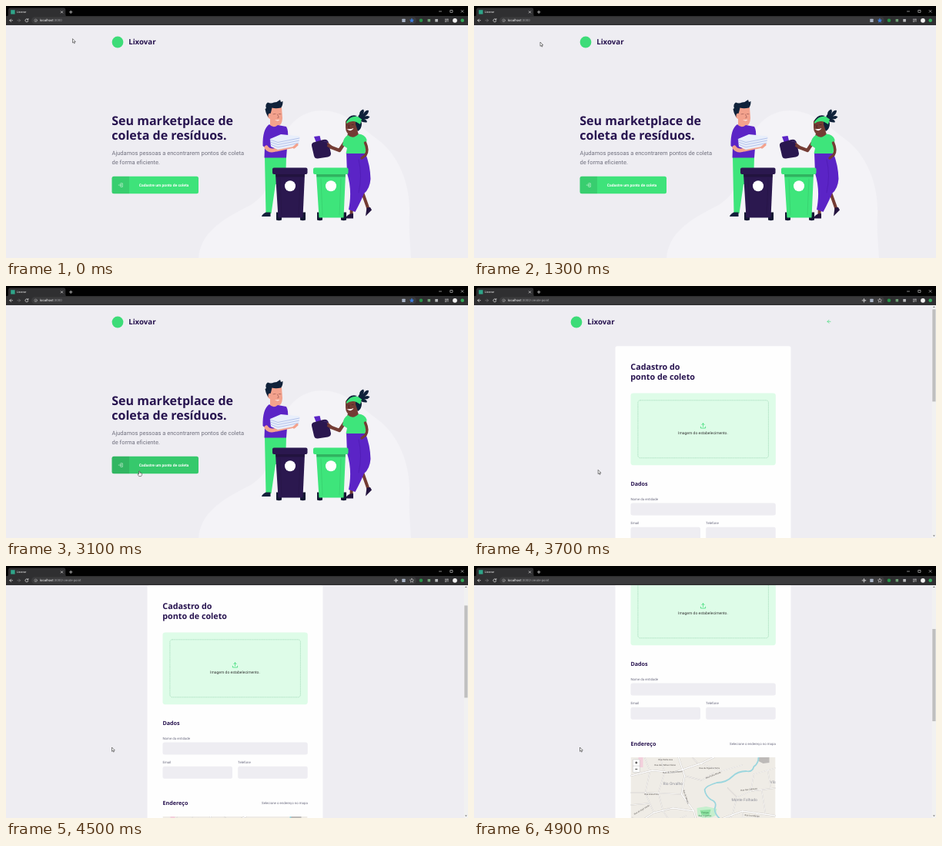
An HTML page for the animation above (5 s loop, 600 by 328 pixels).

```html
<!DOCTYPE html>
<html lang="pt-BR">
<head>
<meta charset="utf-8">
<title>Lixovar</title>
<style>
  html, body { margin: 0; width: 100%; height: 100%; overflow: hidden; background: #eeedf2; }
  svg { display: block; width: 100vw; height: 100vh; font-family: Roboto, sans-serif; text-rendering: geometricPrecision; }
  .head { font-family: "Open Sans", sans-serif; font-weight: 700; fill: #27134f; }
  .note { font-size: 4.38px; fill: #6c6c80; }
  .line { fill: none; stroke-linecap: round; stroke-linejoin: round; }
</style>
</head>
<body>
<svg viewBox="0 0 600 328" preserveAspectRatio="none">
  <defs>
    <clipPath id="mapClip"><rect width="188" height="109.4"/></clipPath>
    <g id="brand">
      <circle cx="7.5" cy="47" r="7.4" fill="#3ddc78"/>
      <text class="head" x="21.7" y="50.2" font-size="9.7">Lixovar</text>
    </g>
    <g id="bin">
      <path d="M5 58H12V68Q8.500 69.500 5 68ZM36 58H43V68Q39.500 69.500 36 68Z" fill="#141733"/>
      <path d="M4 8H42L39.500 65H7.500Z"/>
      <rect width="45.500" height="8.500" rx="2"/>
      <path d="M4 8.500H42L41.800 12H4.200Z" fill="#000" opacity=".22"/>
      <path d="M10 14 12 62M36 14 34 62" stroke="#000" stroke-width=".5" opacity=".15"/>
      <circle cx="23" cy="23.700" r="7" fill="#fff"/>
    </g>
  </defs>
  <rect width="600" height="328" fill="#eeedf2"/>

  <g id="home">
    <path d="M250 328C252 296 282 277 312 262C338 249 346 228 352 195C359 157 382 136 410 136C439 136 458 155 483 174C510 194 525 232 524 270C523 292 525 310 526 328Z" fill="#f4f3f7"/>
    <use href="#brand" x="137.5"/>
    <g class="head" font-size="16">
      <text x="137.3" y="154.6">Seu marketplace de</text>
      <text x="137.3" y="174.2">coleta de resíduos.</text>
    </g>
    <g font-size="7.5" fill="#71717f">
      <text x="137.5" y="193.7">Ajudamos pessoas a encontrarem pontos de coleta</text>
      <text x="137.5" y="205.5">de forma eficiente.</text>
    </g>
    <rect id="button" x="137.5" y="221.8" width="112.5" height="22.5" rx="2.5"/>
    <path d="M140 221.8H160V244.3H140Q137.5 244.3 137.5 241.8V224.3Q137.5 221.8 140 221.8Z" opacity=".09"/>
    <path class="line" d="M149 230.8H151.3V235.4H149M146.2 233.1H149.7M148.3 231.6 149.8 233.1 148.3 234.6" stroke="#fff" stroke-width=".5"/>
    <text x="205" y="234.8" font-size="5" font-weight="700" fill="#fff" text-anchor="middle">Cadastre um ponto de coleta</text>

    <!-- man with papers -->
    <path d="M336 196H364L363 232H350L344.500 270H337.500Z" fill="#3ee57b"/>
    <path d="M337.500 268.500H343.500V274H332Q332.500 271 337.500 268.500Z" fill="#14203c"/>
    <path d="M341.500 133Q350 128 358 132L359 146Q358.500 155 353.500 156L353 161 343 159V147Q339.500 146 340 142Z" fill="#f3a28d"/>
    <path d="M340.500 145Q337 139 336.500 134L338 133Q336 128 340 125.500Q344 127.500 348 125.500Q352 125.500 356 122L357 125 359.500 124Q359.500 130 357 132.500Q350 134 345.500 132.500Q344.500 137 343.500 140Q340 139 340.500 145Z" fill="#10223a"/>
    <path class="line" d="M347 140.800 350 140.400M354.500 140.500 357 140.700M352.500 141 354.300 145 352.700 145.500" stroke="#7b3d3f" stroke-width=".5"/>
    <path d="M349 148Q352 149 355.500 147.700Q353 151 349 148Z" fill="#fff"/>
    <path d="M342 154Q347 160 353 155L364 157Q367 162 366 172L364 197.500H335.500L336 184 333.500 182Q333 160 342 154Z" fill="#5b24c6"/>
    <path class="line" d="M338 184Q342 190 351 187L374 182" stroke="#f3a28d" stroke-width="5"/>
    <path d="M343 173 357 167 381.5 169.500 379 182 353 187 344 183Z" fill="#e8eefb"/>
    <path class="line" d="M343 174 353 177.500 381 172M343.3 177 353 180.500 380.5 175.200M343.6 180.200 353 183.800 379.8 178.500" stroke="#a8b8e6" stroke-width=".8"/>
    <path class="line" d="M374 184 378 180.5" stroke="#f3a28d" stroke-width="3.2"/>

    <!-- woman with container -->
    <path class="line" d="M449 260 448.500 271M462 240 470.500 264" stroke="#743c34" stroke-width="4"/>
    <path d="M451 270V276.500H440.500Q443 272 447 270.500ZM468.500 262.500 473 262 475 265.500 467 273.500Z" fill="#24143f"/>
    <path d="M442 191H466.500Q473 207 473.500 225Q472.500 238 465 244Q461 254 453.500 268L445 265Q450 240 443 218Z" fill="#5b24c6"/>
    <path class="line" d="M458 200Q463 220 458 243" stroke="#4a19ab" stroke-width=".6"/>
    <path class="line" d="M441 176 433 188 420 183" stroke="#743c34" stroke-width="4.500"/>
    <path d="M445 161H456L459 171Q451 177 443 170Z" fill="#743c34"/>
    <path d="M441 150Q446 142 456 146L459 157Q456 167 448 168Q441 166 441 158Z" fill="#743c34"/>
    <path d="M454 144Q461 145 462 153Q462 160 457 163L454 154Z" fill="#10223a"/>
    <path d="M442 150Q446 140 456 143Q450 145 444 150ZM458 148Q456 144 459 141Q459 136 464 134.500Q466 137 463.500 141Q467 135 471 136Q471 141 466 143.500Q471 142 472.500 144.500Q470 148 465 147Q470 149 468.500 151.500Q463 152 458 148Z" fill="#10223a"/>
    <path d="M442 151Q448 142 457 144L462 147.500 460 154 455 151Q449 148 442 153Z" fill="#3ee57b"/>
    <path d="M442.500 160Q447 161 451.500 159Q448.500 165 442.500 160Z" fill="#fff"/>
    <path class="line" d="M442.500 155H444.500M449 154.500H451.300M446 155 444.500 158 446.200 158.400" stroke="#32191f" stroke-width=".5"/>
    <path d="M444 168Q451 174 458 166.500Q466 167 468.500 174L466.500 192H441.500L443 185 437 181Q438 171 444 168Z" fill="#3ee57b"/>
    <path class="line" d="M466.500 178Q471 188 467 194L462 198" stroke="#743c34" stroke-width="3.500"/>
    <path d="M400 170 407.500 169 409.500 177 403 178Z" fill="#5b24c6"/>
    <path d="M399.500 177.500 412 174Q417.500 172.500 419 178L422 192Q422 195.500 418 196.500L405 198.500Q401 199 400 195L397 182Q396.500 178.500 399.500 177.500Z" fill="#2a174f"/>
    <path class="line" d="M413 176Q419 175 420 184" stroke="#48316f" stroke-width="1"/>
    <path class="line" d="M418 182 423 185M418 179 423 183" stroke="#743c34" stroke-width="2.2"/>
    <use href="#bin" x="346" y="210.500" fill="#2b184f"/>
    <use href="#bin" x="399" y="210.500" fill="#3ee57b"/>
  </g>

  <g id="form">
    <use href="#brand" x="125.5"/>
    <path class="line" d="M459 46.3H463M461 44.3 459 46.3 461 48.3" stroke="#3ddc78" stroke-width=".7"/>
    <rect x="183.5" y="78.2" width="228" height="700" rx="2.5" fill="#fefefe"/>
    <g class="head" font-size="10.75">
      <text x="203.3" y="108.9">Cadastro do</text>
      <text x="203.3" y="122">ponto de coleto</text>
    </g>
    <rect x="203.5" y="139.4" width="188.3" height="93.8" rx="3.1" fill="#defce8"/>
    <rect x="212.9" y="148.8" width="169.5" height="75" rx="3" fill="none" stroke="#8fcfaa" stroke-width=".6" stroke-dasharray="1.2 .6"/>
    <path class="line" d="M294.4 183.2V185H300.6V183.2M297.5 183V178.8M295.7 180.6 297.5 178.8 299.3 180.6" stroke="#3ddc78" stroke-width=".8"/>
    <text x="297.4" y="193.3" font-size="5" fill="#333" text-anchor="middle">Imagem do estabelecimento.</text>
    <g class="head" font-size="7.2">
      <text x="203.4" y="260.2">Dados</text>
      <text x="203.4" y="364.1">Endereço</text>
    </g>
    <g class="note">
      <text x="203.5" y="279">Nome da entidade</text>
      <text x="203.5" y="310">Email</text>
      <text x="301" y="310">Telefone</text>
      <text x="391.8" y="363.4" text-anchor="end">Selecione o endereço no mapa</text>
    </g>
    <g fill="#eeedf2">
      <rect x="203.5" y="282.6" width="188.3" height="15.9" rx="2.5"/>
      <rect x="203.5" y="313.8" width="90.5" height="15.9" rx="2.5"/>
      <rect x="301.2" y="313.8" width="90.5" height="15.9" rx="2.5"/>
    </g>
    <g transform="translate(203.5 379)" clip-path="url(#mapClip)">
      <rect width="188" height="110" fill="#efece6"/>
      <path d="M10 0H16V13H10Z" fill="#f3cfdc"/>
      <path d="M166 0H180V7L172 8 166 5Z" fill="#bdbab8"/>
      <path d="M86 66 98 64 112 67 110 76 98 81 87 76Z" fill="#c6efce"/>
      <path d="M90 69 104 68 102 76 92 75Z" fill="#8ee3a2"/>
      <g id="roads" class="line"></g>
      <path class="line" d="M166 0Q166 8 160 12Q158 20 150 18Q139 18 132 25Q124 33 112 33Q98 37 96 42Q97 50 104 55Q113 58 109 67Q109 74 116 80L118 110" stroke="#9bd6de" stroke-width="1.8"/>
      <g id="places"></g>
      <g stroke="#b8b8b8" stroke-width=".5" fill="#fff">
        <rect x="2.8" y="2.8" width="9" height="16.8" rx="1"/>
        <path d="M2.8 11.2H11.8"/>
      </g>
      <path d="M5.8 7H8.8M7.3 5.5V8.5M5.8 15.4H8.8" stroke="#111" stroke-width=".8"/>
    </g>
  </g>

  <g id="scrollbar">
    <rect x="594.7" y="24" width="5.3" height="304" fill="#f1f1f1"/>
    <rect id="thumb" x="595.3" width="4.2" height="120" fill="#bfbfbf"/>
    <path d="M596 28 597.4 26.4 598.8 28ZM596 324.4 597.4 326 598.8 324.4Z" fill="#666"/>
  </g>

  <g id="browser">
    <rect width="600" height="13.5" fill="#020202"/>
    <path d="M1 13.5Q3 13.5 3 11V5Q3 2.6 5.5 2.6H75Q77.3 2.6 77.3 5V11Q77.3 13.5 79.5 13.5Z" fill="#2f2f31"/>
    <rect y="13" width="600" height="12" fill="#2f2f31"/>
    <rect x="33" y="14.2" width="500" height="9.2" rx="4.6" fill="#3b3b3d"/>
    <rect x="6.2" y="5.2" width="5.4" height="5.4" fill="#2fa58a"/>
    <text x="13.8" y="9.4" font-size="3.9" fill="#eee">Lixovar</text>
    <text x="44" y="20.3" font-size="4.35" fill="#fff">localhost<tspan fill="#a0a1a4">:3000<tspan id="path"></tspan></tspan></text>
    <g class="line" stroke="#e6e6e6" stroke-width=".7">
      <path d="M71.3 6.7 73.7 9.1M73.7 6.7 71.3 9.1M82.4 7.9H86M84.2 6.1V9.7"/>
      <path d="M4.8 18.8H8.6M6.6 17 4.8 18.8 6.6 20.6"/>
      <path d="M14.8 18.8H18.6M16.8 17 18.6 18.8 16.8 20.6" stroke="#777"/>
      <path d="M28.4 17.4A2 2 0 1 0 28.9 19.3M28.9 16.4V17.9H27.4"/>
      <circle cx="38.6" cy="18.8" r="1.8" stroke="#bbb" stroke-width=".5"/>
      <path d="M38.6 18.6V19.7" stroke="#bbb" stroke-width=".5"/>
      <path d="M562.5 7H565.5M577.2 5.5H580V8.3H577.2ZM591.2 5.5 594 8.3M594 5.5 591.2 8.3" stroke-width=".6"/>
      <path id="star" d="M527 16.3 527.8 18 529.6 18.2 528.2 19.4 528.6 21.2 527 20.3 525.4 21.2 525.8 19.4 524.4 18.2 526.2 18Z" stroke-width=".5"/>
      <path d="M570.3 17.2H574M570.3 18.8H572.6M570.3 20.4H572M574 17.2V20.3" stroke-width=".6"/>
      <g id="locate" stroke-width=".5"><circle cx="506.5" cy="18.8" r="1.5"/><path d="M506.5 16.3V21.3M504 18.8H509"/></g>
    </g>
    <rect x="514.3" y="16.7" width="4.3" height="4.3" rx=".5" fill="#a9b4c6"/>
    <circle cx="539" cy="18.8" r="2.3" fill="#269447"/>
    <rect x="547.6" y="17" width="3.5" height="3.5" fill="#70a277"/>
    <rect x="557.3" y="17" width="3.6" height="3.6" fill="#b8bbbd"/>
    <circle cx="583" cy="18.8" r="2.9" fill="#f1f1f1"/>
    <circle cx="592.7" cy="18.8" r="2.3" fill="#32aa59"/>
  </g>

  <g id="cursor" stroke="#222" stroke-width=".55" stroke-linejoin="round" fill="#fff">
    <path id="arrow" d="M0 0V5.3L1.2 4.2 2 6.1 2.9 5.7 2.1 3.9H3.8Z"/>
    <path id="hand" d="M-.5 0Q.3-.8.8 0V2.2Q3.4 2.1 3.4 3.3V4.6Q3.2 6.2 2.4 6.6H-.3Q-1.3 5.5-2 3.9Q-1.6 3-.5 4Z"/>
  </g>
</svg>

<script>
const LOOP = 5000, STEP = 100, OPEN = 3400;
const $ = id => document.getElementById(id);

// [time, value, ...] stops, joined by straight segments
const scrollStops = [[0, 0], [4200, 0], [4300, 5], [4400, 19], [4500, 53], [4600, 89], [4700, 114.5], [4800, 125], [4900, 130], [5000, 131]];
const cursorStops = [[0, 86.5, 42.6], [900, 86.5, 42.6], [1300, 86, 47], [1400, 86, 47], [1600, 92, 110], [1800, 107, 215], [1950, 112.5, 241.5],
  [2150, 112.5, 241.5], [2350, 141, 242], [2600, 173, 241], [3500, 173, 241], [4100, 137.5, 236], [5000, 137.5, 236]];
const hoverStops = [[0, 0], [2300, 0], [2500, 1], [5000, 1]];

function at(stops, t) {
  const i = Math.max(1, stops.findIndex(s => s[0] >= t));
  const a = stops[i - 1], b = stops[i];
  const k = (t - a[0]) / (b[0] - a[0]);
  return a.slice(1).map((v, n) => v + (b[n + 1] - v) * k);
}

function buildMap() {
  const main = "M0 24 28 17 55 20 91 8 108 0M62 0 70 24 66 48 82 70 92 110M0 92 30 72 55 66 82 70M118 80 145 70 188 76";
  const side = "M18 0 25 18 19 46 30 72M38 0 44 19 36 46 42 70M0 46 19 46 66 48M0 62 24 60M2 78 40 110M20 79 52 110M42 70 70 110" +
    "M14 102 72 76M26 110 84 86M91 8 118 18 145 10M70 24 92 30 108 20M80 0 88 9M112 110 132 75 138 52 156 44 188 40" +
    "M138 52 126 40M156 44 160 22 188 14M170 42 175 73M145 70 150 110M164 73 168 110M118 94 188 92M178 17 182 40";
  const draw = (d, color, width) => `<path d="${d}" stroke="${color}" stroke-width="${width}"/>`;
  $("roads").innerHTML = draw(side, "#c9c4bf", 1.3) + draw(main, "#bdb8b4", 2) + draw(side, "#fff", .8) + draw(main, "#fff", 1.4);

  const streets = [["Rua Pedra Lisa", 36, 3.5, 0], ["Rua das Telhas Claras", 31, 11, 0], ["Rua do Sabiá Manso", 42, 21, -4],
    ["Rua da Figueira Torta", 89, 14.5, 0], ["Rua Folha Miúda", 98, 28, -22], ["Rua Areia Fina", 18, 49, 0],
    ["Rua do Cipó Verde", 5, 75, -31], ["Rua Barro Novo", 28, 88, 45], ["Rua das Cabaças", 143, 44, -7],
    ["Rua Lua Mansa", 148, 76, 5], ["Rua do Moinho", 68, 43, 72], ["Rua Vento Sul", 140, 100, -76]];
  const label = ([name, x, y, turn], size, color) =>
    `<text transform="translate(${x} ${y}) rotate(${turn})" font-size="${size}" fill="${color}">${name}</text>`;
  $("places").innerHTML = streets.map(s => label(s, 2.8, "#55504d")).join("") +
    [["Rio Orvalho", 42, 35.5, 0], ["Monte Folhado", 131, 56.5, 0], ["Vila Clara", 181, 33.5, 0]].map(s => label(s, 5, "#8b8c97")).join("") +
    [["Parque", 92, 73, 0], ["das Cigarras", 88, 76.5, 0]].map(s => label(s, 3, "#327b48")).join("");
}

function mix(a, b, k) {
  return `rgb(${a.map((v, i) => Math.round(v + (b[i] - v) * k))})`;
}

function show(id, on) {
  $(id).style.display = on ? "" : "none";
}

function render(time) {
  const t = Math.floor(time % LOOP / STEP) * STEP;
  const opened = t >= OPEN;
  const [scroll] = at(scrollStops, t);
  const [hover] = at(hoverStops, t);
  const pointing = t >= 2400 && !opened;

  show("home", !opened);
  ["form", "scrollbar", "locate"].forEach(id => show(id, opened));
  show("hand", pointing);
  show("arrow", !pointing);
  $("button").setAttribute("fill", mix([62, 227, 122], [54, 201, 108], hover));
  $("form").setAttribute("transform", `translate(0 ${-scroll})`);
  $("thumb").setAttribute("y", 30.4 + scroll * .397);
  $("path").textContent = opened ? "/create-point" : "";
  $("star").setAttribute("style", opened ? "" : "fill: #3f7fe0; stroke: #3f7fe0");
  $("cursor").setAttribute("transform", `translate(${at(cursorStops, t).join(" ")})`);
}

buildMap();
const start = performance.now();
function tick() {
  render(performance.now() - start);
  requestAnimationFrame(tick);
}
tick();
</script>
</body>
</html>
```
